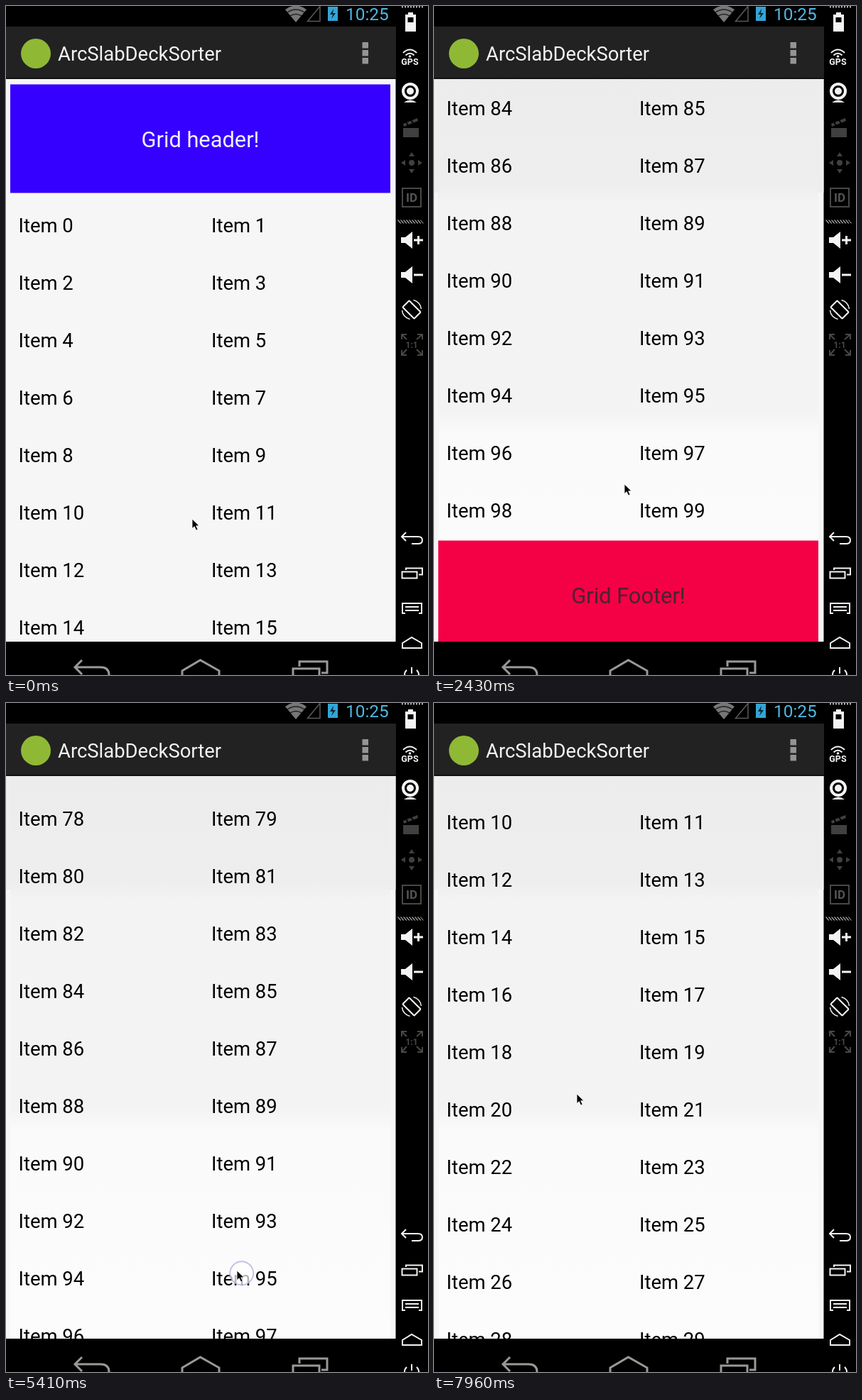
Animation of 594 by 943 pixels, one loop 8000 ms. Source, as an HTML page:

```html
<!DOCTYPE html>
<html lang="en">
<head>
<meta charset="utf-8">
<title>Scrolling grid</title>
<style>
  html, body { margin: 0; width: 100%; height: 100%; overflow: hidden; background: #000; }
  svg { display: block; width: 100%; height: 100%; }
  text { font-family: Roboto, sans-serif; font-size: 27.45px; }
  .banner { font-size: 30.8px; text-anchor: middle; }
  .line { fill: none; stroke: #f4f4f4; stroke-width: 2; }
  .white { fill: #f4f4f4; }
  .dim { fill: #404040; }
  .dimline { fill: none; stroke: #484848; stroke-width: 2; }
  .nav { fill: none; stroke: #999; stroke-width: 3; }
  .small { font-weight: 700; text-anchor: middle; }
</style>
</head>
<body>
<svg viewBox="0 0 594 943">
  <defs>
    <clipPath id="window"><rect y="103" width="548.5" height="793"/></clipPath>
    <linearGradient id="shade" gradientUnits="userSpaceOnUse" x1="0" y1="103" x2="0" y2="896">
      <stop offset="0" stop-color="#ececec"/>
      <stop offset=".19" stop-color="#eeeeee"/>
      <stop offset=".22" stop-color="#f3f3f3"/>
      <stop offset=".59" stop-color="#f3f3f3"/>
      <stop offset=".63" stop-color="#fafafa"/>
      <stop offset="1" stop-color="#fcfcfc"/>
    </linearGradient>
    <path id="speaker" class="white" d="M556 326h6l10-8v24l-10-8h-6zM574 328.500h13v3h-13z"/>
  </defs>
  <rect width="594" height="943"/>

  <!-- list -->
  <g clip-path="url(#window)">
    <rect y="103" width="549" height="793" fill="#f6f6f6"/>
    <g id="shaded">
      <rect x="6" y="103" width="535" height="793" fill="url(#shade)"/>
      <path d="M0 103h6v160h-6zM541 103h8v160h-8z" fill="#eee"/>
    </g>
    <g id="list">
      <rect x="6" y="110.500" width="535" height="153" fill="#3500ff"/>
      <text class="banner" x="273.500" y="199" fill="#f4f0ff">Grid header!</text>
      <rect x="6" y="4320.500" width="535" height="153" fill="#f40045"/>
      <text class="banner" x="273.500" y="4409" fill="#4d2230">Grid Footer!</text>
    </g>
  </g>

  <!-- status and title bars -->
  <path d="M393 5q15-11 30 0l-15 18z" fill="#777"/>
  <path d="M396 9q12-8 24 0M400 14q8-5 16 0" fill="none" stroke="#222" stroke-width="1.5"/>
  <path d="M424.500 21.500h17.500v-21z" fill="none" stroke="#5a5a5a" stroke-width="1.500"/>
  <path d="M453 1h14v20h-14z" fill="#33a5d5"/>
  <path d="M461 4l-5 8h4l-2 6 6-8h-4z" fill="#0b2530"/>
  <text x="478" y="20" fill="#4fb8e2" style="font-size:24.4px">10:25</text>
  <rect y="29" width="549" height="72" fill="#222"/>
  <rect y="101" width="549" height="2" fill="#111"/>
  <circle cx="42" cy="67" r="21" fill="#8fb935"/>
  <text x="73" y="77" fill="#f3f3f3">ArcSlabDeckSorter</text>
  <path d="M501.500 51h8.500v8.500h-8.500zM501.500 62h8.500v8.500h-8.500zM501.500 73h8.500v8.500h-8.500z" fill="#949494"/>

  <!-- navigation bar -->
  <path class="nav" d="M107 922l-10 10 10 10M97 932h36q12 0 12 11M248 945v-8l25.500-15 26.500 15v8M404 945v-11h37v11M413 931v-7h39v16h-8"/>

  <!-- side tools -->
  <path d="M557 1h32" stroke="#aaa" stroke-width="3" stroke-dasharray="2 2"/>
  <path d="M0-2.500h33" stroke="#bbb" stroke-width="5" stroke-dasharray="1.500 2.500" transform="translate(555 306.500) skewX(40)"/>
  <path class="white" d="M566 9h7v3h4v24h-15V12h4z"/>
  <path d="M565.500 16h8v7h-8z"/>
  <path class="line" d="M559 66q9.500-9 19 0M562.500 69.500q6-5.500 12 0"/>
  <circle class="white" cx="568.500" cy="71" r="1.800"/>
  <text class="small white" x="568.500" y="82.500" style="font-size:12.500px">GPS</text>
  <circle class="line" cx="569" cy="120" r="10" style="stroke-width:4"/>
  <circle class="white" cx="569" cy="120" r="5"/>
  <path class="white" d="M560 136q9-7 18 0z"/>
  <path class="dim" d="M559 172h22v13h-22zM559 166l20-8 1 4-20 8z"/>
  <path d="M563 164l3 4M570 161l3 4" stroke="#000" stroke-width="2"/>
  <path class="dim" d="M571 206l4 6h-8zM571 236l4-6h-8zM556 221l6-4v8zM586 221l-6-4v8z"/>
  <circle class="dim" cx="571" cy="221" r="4"/>
  <rect class="dimline" x="558" y="257" width="26" height="26"/>
  <text class="small" x="571" y="276" fill="#555" style="font-size:17px">ID</text>
  <use href="#speaker"/>
  <path class="white" d="M579 324h3v12h-3z"/>
  <use href="#speaker" y="49"/>
  <g class="line" transform="translate(571 428)">
    <rect x="-6.500" y="-11.500" width="13" height="23" rx="1" transform="rotate(-45)"/>
    <path d="M-13.500 1a14 14 0 0 0 11 12.500M13.500-1a14 14 0 0 0-11-12.500" style="stroke-width:1.500"/>
  </g>
  <path class="dimline" d="M564 470l-7-7m0 7v-7h7M578 470l8-7m-7 0h7v7M564 484l-7 8m0-7v7h7M578 484l8 8m-7 0h7v-7"/>
  <text class="small" x="571" y="482" fill="#484848" style="font-size:12px">1:1</text>
  <g class="line">
    <path d="M563 742l-6 6 6 6M557 748h23q6 0 6 5t-6 5h-9"/>
    <path d="M557.500 797.500h21v9h-21zM563 795v-2.500h23v9h-5"/>
    <path d="M562 856h-4v-14h27v14h-4M562 847h19M562 852h19"/>
    <path d="M558 905v-7l13-8 14 8v7z"/>
    <path d="M571 932v9M564 936a10 10 0 0 0-3 8M578 936a10 10 0 0 1 3 8"/>
  </g>

  <!-- pointer -->
  <circle id="touch" r="16.500" fill="#fff" fill-opacity=".7" stroke="#b4b4df" stroke-opacity=".8" stroke-width="2"/>
  <path id="cursor" d="M0 0v13.500l3.200-2.800 2.400 5.300 2.500-1.100-2.400-5.100h4.300z" stroke="#fff" stroke-width=".8"/>
</svg>
<script>
  const LOOP = 8000, END = 3585, ROW = 81;
  const byId = id => document.getElementById(id);
  const [list, shaded, touch, cursor] = ['list', 'shaded', 'touch', 'cursor'].map(byId);

  for (let i = 0; i < 100; i++) {
    const label = document.createElementNS(list.namespaceURI, 'text');
    label.setAttribute('x', i % 2 ? 289 : 17.5);
    label.setAttribute('y', 319 + ROW * Math.floor(i / 2));
    label.textContent = 'Item ' + i;
    list.append(label);
  }

  const smooth = u => u * u * (3 - 2 * u);
  const flick = u => u ** 1.6;

  // time, x, y, easing towards this point
  const path = [
    [0, 262, 723], [170, 262, 723], [600, 266, 420], [1180, 257, 739], [1480, 257, 739],
    [1700, 270, 330, flick], [2430, 268, 674], [2520, 270, 520], [2790, 270, 520],
    [3320, 278, 798], [3600, 278, 798], [4600, 286, 483], [4800, 286, 483],
    [5400, 325, 800], [5600, 332, 800], [6330, 343, 382], [6880, 390, 905, flick],
    [7100, 388, 912], [7960, 201, 551], [LOOP, 201, 551]
  ];
  const presses = [[170, 1700], [2790, 4640], [4800, 6880]];

  function pointer(t) {
    const n = Math.max(1, path.findIndex(p => p[0] >= t));
    const [t0, x0, y0] = path[n - 1];
    const [t1, x1, y1, ease = smooth] = path[n];
    const k = ease(Math.max(0, (t - t0) / (t1 - t0)));
    return [x0 + (x1 - x0) * k, y0 + (y1 - y0) * k];
  }

  const fling = (t, start, stop, from, to, power) =>
    to + (from - to) * (1 - (t - start) / (stop - start)) ** power;

  function scroll(t) {
    const y = pointer(t)[1];
    if (t < 1700) return Math.max(0, 723 - y);
    if (t < 2520) return fling(t, 1700, 2520, 393, END, 2.32);
    if (t < 6330) return END - Math.max(0, y - 520);
    if (t < 6880) return END - (y - 382);
    return fling(t, 6880, 8180, 3062, 473, 2);
  }

  const move = (node, x, y) => node.setAttribute('transform', `translate(${x} ${y})`);

  function draw(now) {
    const t = now % LOOP;
    const [tx, ty] = pointer(Math.max(0, t - 40));
    move(list, 0, -Math.round(scroll(t)));
    move(cursor, ...pointer(t));
    move(touch, tx + 7, ty + 6);
    touch.style.display = presses.some(([a, b]) => t >= a && t < b) ? '' : 'none';
    shaded.style.display = t < 170 ? 'none' : '';
    requestAnimationFrame(draw);
  }
  draw(performance.now());
</script>
</body>
</html>
```
